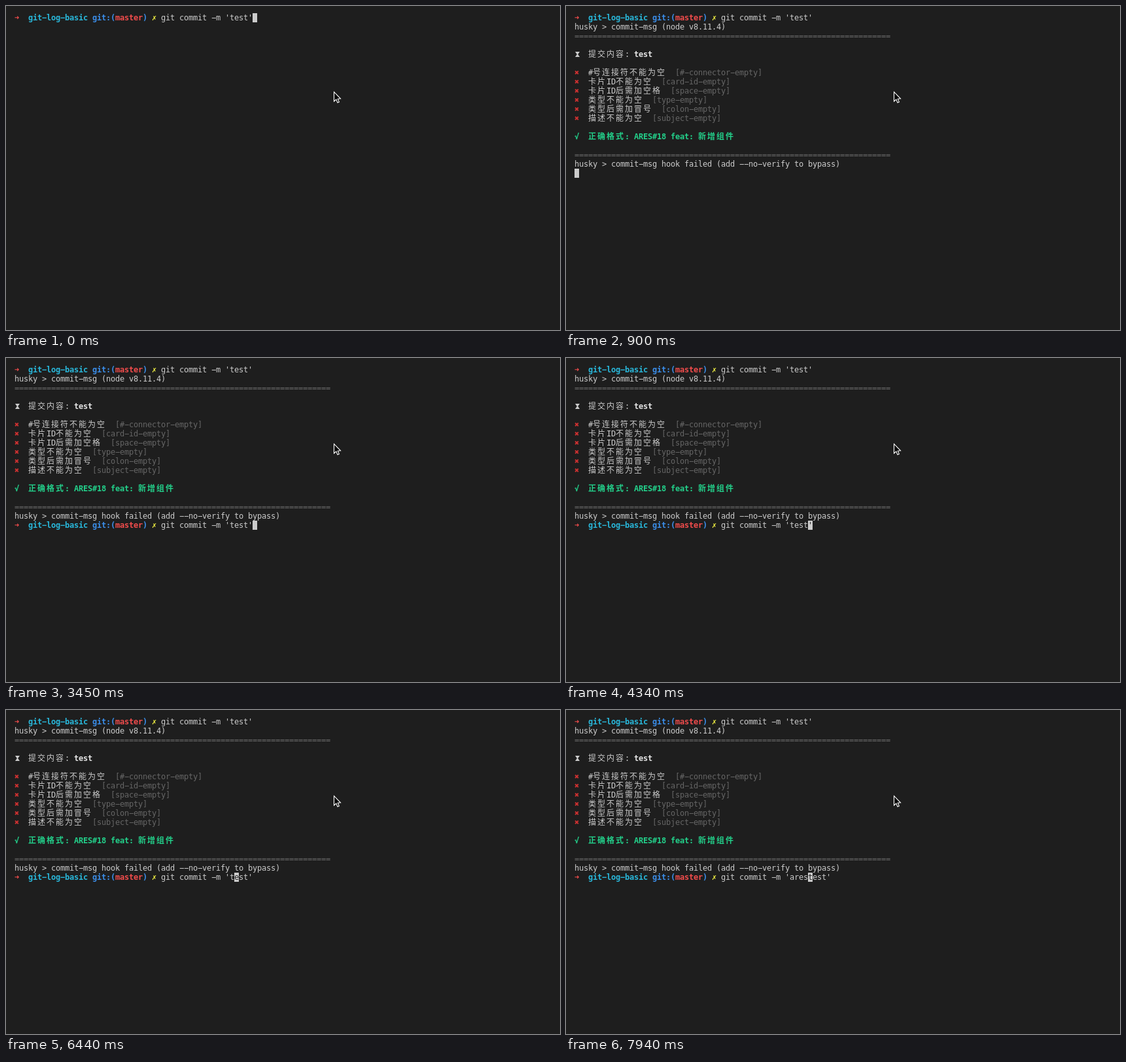
An HTML page with a canvas that plays this animation: 847 px wide and 496 px high, repeating every 8000 ms.

```html
<!DOCTYPE html>
<html lang="zh-CN">
<head>
<meta charset="utf-8">
<title>Terminal</title>
<style>
  html, body { margin: 0; width: 100%; height: 100%; overflow: hidden; background: #1e1e1e; }
  canvas { display: block; }
</style>
</head>
<body>
<canvas id="stage" width="847" height="496"></canvas>
<script>
const ctx = document.getElementById('stage').getContext('2d');
const LOOP = 8000, LEFT = 13, TOP = 11, CELL = 7, LINE = 14;
const FONT = '12px "DejaVu Sans Mono", "Noto Sans CJK SC", "Noto Sans CJK JP", monospace';
const BG = '#1e1e1e', FG = '#cccccc', DIM = '#666666', RED = '#f14c4c', CROSS = '#cd3131',
      CYAN = '#29b8db', BLUE = '#3b8eea', YELLOW = '#f5f543', GREEN = '#23d18b', WHITE = '#e5e5e5';

const RULE = [['='.repeat(69), DIM]];
const ERRORS = [
  ['#号连接符不能为空', '#-connector-empty'],
  ['卡片ID不能为空', 'card-id-empty'],
  ['卡片ID后需加空格', 'space-empty'],
  ['类型不能为空', 'type-empty'],
  ['类型后需加冒号', 'colon-empty'],
  ['描述不能为空', 'subject-empty']
];
const OUTPUT = [
  [['husky > commit-msg (node v8.11.4)', FG]],
  RULE,
  [],
  [['⧗  提交内容: ', FG], ['test', WHITE, true]],
  [],
  ...ERRORS.map(([label, rule]) => [['✖  ', CROSS], [label + '  ', FG], [`[${rule}]`, DIM]]),
  [],
  [['√  正确格式: ARES#18 feat: 新增组件', GREEN, true]],
  [],
  RULE,
  [['husky > commit-msg hook failed (add --no-verify to bypass)', FG]]
];
const PROMPT_ROW = OUTPUT.length + 1;
const COMMAND_COL = 32;
const command = message => `git commit -m '${message}'`;

// Edits to the second command line: start time, text, cursor column.
const EDITS = [
  [1050, '', 32],
  [3450, command('test'), 52],
  [4340, command('test'), 51],
  [5990, command('test'), 50],
  [6290, command('test'), 49],
  [6440, command('test'), 48],
  [6740, command('test'), 47],
  [7340, command('atest'), 48],
  [7640, command('aretest'), 50],
  [7940, command('arestest'), 51]
];

const isWide = ch => ch >= '\u3000' && ch <= '\uffef';

function drawHourglass(x, y) {
  ctx.beginPath();
  ctx.moveTo(x + 1, y + 3);
  ctx.lineTo(x + 8, y + 3);
  ctx.lineTo(x + 5.2, y + 7);
  ctx.lineTo(x + 8, y + 11);
  ctx.lineTo(x + 1, y + 11);
  ctx.lineTo(x + 3.8, y + 7);
  ctx.fill();
}

function drawGlyph(ch, x, y) {
  if (ch === '⧗') drawHourglass(x, y);
  else ctx.fillText(ch === '-' ? '−' : ch, x, y + 11);
}

function drawText(text, col, row, color, bold) {
  ctx.fillStyle = color;
  ctx.font = (bold ? 'bold ' : '') + FONT;
  for (const ch of text) {
    if (ch !== ' ') drawGlyph(ch, LEFT + col * CELL, TOP + row * LINE);
    col += isWide(ch) ? 2 : 1;
  }
  return col;
}

function drawRow(parts, row) {
  let col = 0;
  for (const [text, color, bold] of parts) col = drawText(text, col, row, color, bold);
}

function drawPrompt(row, text) {
  drawRow([
    ['➜  ', RED, true], ['git-log-basic ', CYAN, true], ['git:(', BLUE, true],
    ['master', RED, true], [') ', BLUE, true], ['✗ ', YELLOW, true], [text, FG]
  ], row);
}

function drawCursor(col, row, under = ' ') {
  ctx.fillStyle = FG;
  ctx.fillRect(LEFT + col * CELL, TOP + row * LINE, CELL, LINE);
  drawText(under, col, row, BG);
}

function drawPointer() {
  ctx.beginPath();
  ctx.moveTo(501.5, 131.5);
  ctx.lineTo(501.5, 146);
  ctx.lineTo(504.8, 143);
  ctx.lineTo(507, 148);
  ctx.lineTo(509.3, 147);
  ctx.lineTo(507.2, 142.2);
  ctx.lineTo(511.5, 141.8);
  ctx.closePath();
  ctx.fillStyle = '#000';
  ctx.fill();
  ctx.strokeStyle = '#fff';
  ctx.lineWidth = 1.1;
  ctx.stroke();
}

function draw(t) {
  ctx.fillStyle = BG;
  ctx.fillRect(0, 0, 847, 496);
  drawPrompt(0, command('test'));

  if (t < 300) drawCursor(52, 0);
  else if (t < 900) drawCursor(0, 1);
  else {
    OUTPUT.forEach((parts, i) => drawRow(parts, i + 1));
    const edit = EDITS.filter(([start]) => t >= start).pop();
    if (edit) {
      const [, text, col] = edit;
      drawPrompt(PROMPT_ROW, text);
      drawCursor(col, PROMPT_ROW, text[col - COMMAND_COL]);
    } else drawCursor(0, PROMPT_ROW);
  }
  drawPointer();
}

const origin = performance.now();
function tick() {
  draw((performance.now() - origin) % LOOP);
  requestAnimationFrame(tick);
}
tick();
</script>
</body>
</html>
```
